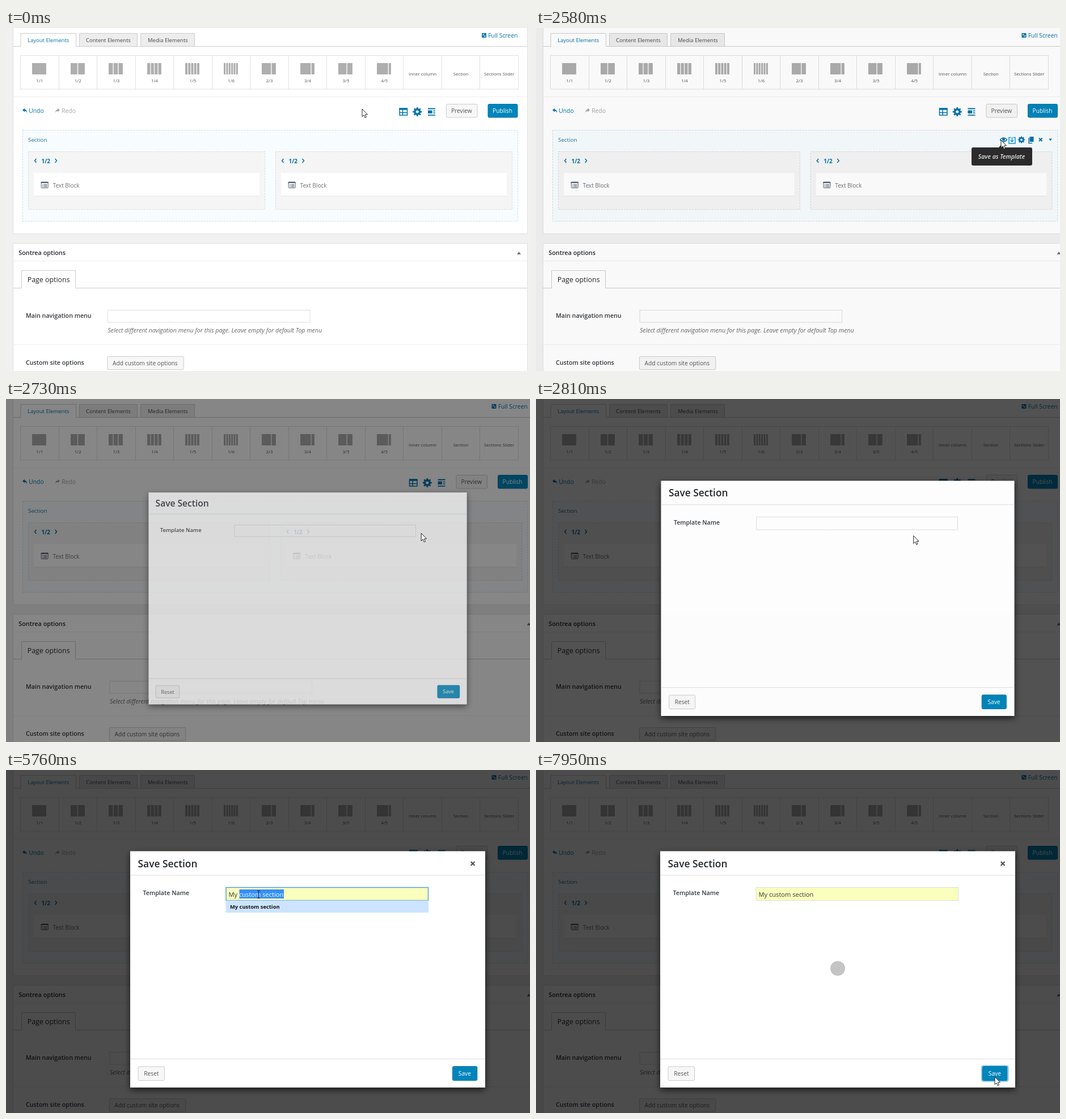
Write an HTML page that moves like this. It is 924x606 px and loops after 8 s.

```html
<!DOCTYPE html>
<html lang="en">
<head>
<meta charset="utf-8">
<title>Save section as template</title>
<style>
  html, body { margin: 0; width: 100%; height: 100%; overflow: hidden; background: #f1f1f1; }
  svg { display: block; width: 924px; height: 606px; font-family: "Open Sans", "Noto Sans", sans-serif; }
  text { white-space: pre; }
</style>
</head>
<body>
<svg id="stage" viewBox="0 0 924 606" xmlns="http://www.w3.org/2000/svg"></svg>
<script>
const LOOP = 8000;
const BLUE = '#0073aa';
const stage = document.getElementById('stage');

// Markup helpers
const text = (x, y, str, size = 10.2, fill = BLUE, extra = '') =>
  `<text x="${x}" y="${y}" font-size="${size}" fill="${fill}" ${extra}>${str}</text>`;
const rect = (x, y, w, h, fill, stroke = 'none', extra = '') =>
  `<rect x="${x}" y="${y}" width="${w}" height="${h}" fill="${fill}" stroke="${stroke}" ${extra}/>`;
const path = (d, fill = 'none', stroke = 'none', width = 1, extra = '') =>
  `<path d="${d}" fill="${fill}" stroke="${stroke}" stroke-width="${width}" ${extra}/>`;
const group = (id, content, extra = '') => `<g id="${id}" ${extra}>${content}</g>`;
const at = (x, y, content) => `<g transform="translate(${x} ${y})">${content}</g>`;
const button = (x, y, w, h, label, tx, primary) =>
  rect(x, y, w, h, primary ? '#0085ba' : '#f7f7f7', primary ? '#0073aa' : '#ccc', 'rx="2"') +
  text(tx, y + h / 2 + 3.8, label, 10.2, primary ? '#fff' : '#555');
const bold = 'font-weight="600"';
const italic = 'font-style="italic"';
const center = 'text-anchor="middle"';

const gear = (x, y, r) => at(x, y,
  `<g fill="none" stroke="${BLUE}"><circle r="${r * .56}" stroke-width="${r * .46}"/>` +
  `<circle r="${r * .85}" stroke-width="${r * .34}" pathLength="16" stroke-dasharray="1 1" stroke-dashoffset=".5"/></g>`);

function layoutElements() {
  const labels = ['1/1', '1/2', '1/3', '1/4', '1/5', '1/6', '2/3', '3/4', '3/5', '4/5',
    'Inner column', 'Section', 'Sections Slider'];
  const cell = 878 / 13;
  return rect(25.5, 48.5, 878, 59.5, '#fff', '#e1e1e1') + labels.map((label, i) => {
    const left = 25.5 + i * cell, cx = left + cell / 2;
    let out = i ? path(`M${Math.floor(left) + .5} 48.5V108`, 'none', '#e1e1e1') : '';
    if (i > 9) return out + text(cx, 83.5, label, 7.9, '#555', center);
    const [a, b] = label.split('/').map(Number);
    const parts = i < 6 ? Array(b).fill(1 / b) : [a / b, 1 - a / b];
    let x = Math.floor(cx - 12.7);
    for (const p of parts) {
      out += rect(x, 62, p * 26.2 - 1.3, 20, '#aeaeae');
      x += p * 26.2;
    }
    return out + text(cx, 96, label, 7.9, '#555', center);
  }).join('');
}

function column(x, w) {
  return at(x, 0,
    rect(0, 218.5, w, 102, '#f5f5f5', '#d9d9d9', 'stroke-dasharray="3 2"') +
    path('M14 231L11 234.5 14 238M47 231L50 234.5 47 238', 'none', BLUE, 1.5) +
    text(23, 238.6, '1/2', 10, BLUE, 'font-weight="700"') +
    rect(9.5, 256, w - 19, 41.5, '#e4e4e4') + rect(9.5, 256, w - 19, 40.5, '#fff') +
    rect(22.7, 272, 12, 10.5, '#fff', '#5d6470', 'rx="1"') +
    path('M22 273H35', 'none', '#5d6470', 2) +
    path('M24.5 276.5H26M24.5 278.5H26M24.5 280.5H26M27 276.5H33M27 278.5H33M27 280.5H33', 'none', '#5d6470') +
    text(43, 281.6, 'Text Block', 10.1, '#6c7075'));
}

function sectionTools(d) {
  return at(d, 0,
    path('M801 197.5Q807 190.5 813 197.5 807 204.5 801 197.5Z', '#fff', BLUE, 1.3) +
    `<circle cx="807" cy="197" r="2.5" fill="${BLUE}"/>` +
    path('M820 193.5H816.5V204H827.5V193.5H824M822 193V200M819.5 198.5L822 201 824.5 198.5', 'none', '#109bd8', 1.5) +
    gear(838.5, 197.5, 6) +
    rect(853, 192, 7, 9, BLUE) + path('M851.5 194V203.5H857.5', 'none', BLUE, 1.4) +
    path('M869.5 194.5L875 200M875 194.5L869.5 200', 'none', BLUE, 1.9) +
    path('M886.8 195.5H892.5L889.6 199.5Z', BLUE));
}

// d: extra width gained once the scrollbar is gone
function page(d) {
  const right = 919 + d, field = d * .2, col = 417 + d / 2;
  const undo = path('M29 145L33 141.8V144Q37 144 36.8 150 35.5 146.6 33 146.6V148.4Z', 'currentColor');
  return rect(12.5, -5, right - 12, 368.5, '#fff', '#e1e1e1') +
    path(`M12 32.5H${right}`, 'none', '#ccc') +
    path('M26 33V9.5H123.5V33', '#fff', '#ccc') +
    path('M129.5 32.5V9.5H231.5V32.5ZM237.5 32.5V9.5H332.5V32.5Z', '#ededed', '#ccc') +
    text(38, 25, 'Layout Elements', 9.5) +
    text(141, 25, 'Content Elements', 9.5, '#444') +
    text(250, 25, 'Media Elements', 9.5, '#444') +
    at(d, 0, rect(839, 9, 8, 8, BLUE, 'none', 'rx="1"') +
      path('M841 11L845 15M841 13.5V11H843.5M845 12.5V15H842.5', 'none', '#fff', .8) +
      text(850.3, 16.8, 'Full Screen', 10.3)) +
    layoutElements() +
    path(`M13 121.5H${right}`, 'none', '#eee') +
    `<g color="${BLUE}">${undo}</g>` + text(40.3, 150, 'Undo', 10.3) +
    `<g color="#a0a5aa" transform="translate(124 0) scale(-1 1)">${undo}</g>` + text(98.2, 150, 'Redo', 10.3, '#a0a5aa') +
    at(d, 0,
      rect(694, 142, 13.5, 12, '#fff', BLUE, 'stroke-width="1.5"') +
      path('M693.5 143.2H708', 'none', BLUE, 3) +
      path('M694 149.5H708M699.5 144V154', 'none', BLUE, 1.5) +
      gear(725.3, 148, 7.8) +
      path('M744 142.5H757M744 153.8H757', 'none', BLUE, 1.8) +
      rect(744, 145.5, 7.5, 5.5, BLUE) + path('M753 146.5H757M753 150H757', 'none', BLUE, 1.5) +
      button(776.5, 134.5, 54.5, 23.5, 'Preview', 785, false) +
      button(850, 134.5, 52, 23.5, 'Publish', 858, true)) +
    rect(29.5, 180.5, 873 + d, 161, '#f7fcfe', '#cfdde2', 'stroke-dasharray="3 2"') +
    text(39, 200.6, 'Section', 9.8, '#1f7099') +
    column(39.5, col) + column(475.5 + d / 2, col) +
    rect(12.5, 380.5, right - 12, 240, '#fff', '#e1e1e1') +
    text(22.3, 400.6, 'Sontrea options', 10.8, '#23282d', bold) +
    at(d, 0, path('M901 400L904.5 395 908 400Z', '#72777c')) +
    path(`M13 411.5H${right}M13 559.5H${right}`, 'none', '#eee') +
    path(`M12 459.5H27.5V428.5H122.5V459.5H${right}`, 'none', '#ccc') +
    text(37.7, 449, 'Page options', 12.4, '#23282d') +
    text(35, 511.8, 'Main navigation menu', 10.7, '#32373c', bold) +
    text(35, 595, 'Custom site options', 10.7, '#32373c', bold) +
    at(field, 0,
      rect(179.5, 498.5, 356.5, 21.5, '#fff', '#ddd') +
      text(179.5, 538.4, 'Select different navigation menu for this page. Leave empty for default Top menu', 10.67, '#666', italic) +
      button(178.8, 580.5, 134.5, 23, 'Add custom site options', 188, false));
}

const modal =
  rect(219, 143.5, 626, 417.5, '#fff', 'none', 'filter="url(#shadow)"') +
  path('M219 186H845M219 510.5H845', 'none', '#ddd') +
  text(232.5, 171.6, 'Save Section', 17.4, '#23282d', bold) +
  group('close', path('M819.7 162L826.5 168.8M826.5 162L819.7 168.8', 'none', '#5c504a', 2.3)) +
  text(241.5, 221, 'Template Name', 10.7, '#32373c', bold) +
  rect(388, 207.5, 356.5, 23, '#fff', '#ddd', 'id="field"') +
  rect(411.5, 211, 78.5, 16, '#3390ff', 'none', 'id="selection"') +
  `<text y="223.5" x="392.5" font-size="11.1" fill="#32373c"><tspan id="typed"></tspan><tspan id="rest"></tspan></text>` +
  rect(0, 211, 1, 16, '#222', 'none', 'id="caret"') +
  group('suggest', rect(388, 231, 356.5, 20.5, '#fff', '#c9d3dc', 'id="option"') +
    text(395, 244.6, 'My custom section', 9.4, '#111', 'font-weight="700"')) +
  button(233, 524, 46.5, 24.5, 'Reset', 243.3, false) +
  rect(786, 522.8, 46.5, 27, 'none', '#7fc4ea', 'id="ring" rx="3" stroke-width="2"') +
  button(787.5, 523.7, 43.3, 24.8, 'Save', 797.8, true) +
  '<circle id="loader" cx="532" cy="350.5" r="13" fill="#c4c4c4"/>';

const cursors =
  group('arrow', path('M0 0V13.7L3.1 10.8 5.2 15.7 7.4 14.7 5.3 9.9H9.5Z', '#fff', '#111', .9)) +
  group('hand', path('M-1.3 1Q0-.8 1.3 1V6.5Q3 5.6 4 7 6 6.4 6.6 7.8 9 7.4 9 9.5V13L7.5 17H-.5L-5.5 10.5Q-5.3 8.2-3 9.3L-1.3 11Z', '#fff', '#111', .9)) +
  group('beam', path('M-2.5-6.5H-.5L0-6 .5-6.5H2.5M0-6V6M-2.5 6.5H-.5L0 6 .5 6.5H2.5', 'none', '#222', 1.1));

stage.innerHTML =
  '<defs><filter id="shadow" x="-10%" y="-10%" width="120%" height="125%">' +
  '<feDropShadow dx="0" dy="4" stdDeviation="6" flood-opacity=".7"/></filter></defs>' +
  rect(0, 0, 924, 606, '#f1f1f1') +
  group('pageNarrow', page(0)) + group('pageWide', page(17.5)) +
  group('toolsNarrow', sectionTools(0)) + group('toolsWide', sectionTools(17.5)) +
  group('tooltip', rect(768, 211, 107, 32, '#2d2d2d', 'none', 'rx="3"') + path('M815 212L821.5 205 828 212Z', '#2d2d2d') +
    text(779.8, 231, 'Save as Template', 10.5, '#eee', `${italic} ${bold}`)) +
  rect(0, 0, 924, 606, '#000', 'none', 'id="overlay"') +
  group('modal', modal) + group('cursor', cursors);

const el = {};
stage.querySelectorAll('[id]').forEach(node => el[node.id] = node);
const fade = (id, value) => el[id].setAttribute('opacity', Number(value));
const put = (id, attrs) => Object.entries(attrs).forEach(([k, v]) => el[id].setAttribute(k, v));

const ramp = (t, a, b) => Math.min(1, Math.max(0, (t - a) / (b - a)));
const smooth = (t, a, b) => { const p = ramp(t, a, b); return p * p * (3 - 2 * p); };
const within = (t, ...spans) => spans.some(([a, b]) => t >= a && t < b);

// Pointer track: time, x, y
const track = [
  [130, 628, 143], [400, 692, 184], [620, 768, 232], [780, 806, 219], [930, 821, 198.5],
  [2500, 820, 198], [2590, 820, 198], [2730, 733, 237], [2890, 600, 246], [3080, 495, 240],
  [3270, 452, 231], [3480, 445.5, 220], [6600, 445.5, 220], [6800, 548, 322], [6980, 715, 468],
  [7160, 862, 546], [7280, 846, 551], [7470, 809, 542]
];
function pointer(t) {
  const i = track.findIndex(k => k[0] > t);
  if (i === 0) return track[0].slice(1);
  if (i < 0) return track[track.length - 1].slice(1);
  const [a, b] = [track[i - 1], track[i]], p = ramp(t, a[0], b[0]);
  return [1, 2].map(n => a[n] + (b[n] - a[n]) * p);
}

function render(t) {
  const wide = t >= 2500;
  fade('pageNarrow', !wide);
  fade('pageWide', wide);
  fade('toolsNarrow', within(t, [390, 2500]));
  fade('toolsWide', within(t, [2500, 2650]));
  fade('tooltip', ramp(t, 960, 1165) * (1 - ramp(t, 2600, 2720)));
  fade('overlay', .7 * smooth(t, 2550, 2842));

  const open = smooth(t, 2585, 2830), scale = .71 + .29 * open;
  put('modal', { opacity: Math.pow(open, .8), transform: `translate(532 352.3) scale(${scale}) translate(-532 -352.3)` });
  fade('close', t >= 2960);

  const focused = within(t, [3430, 7630]), filled = t >= 5760, picking = within(t, [5760, 6060]);
  put('field', {
    fill: filled ? '#faffbd' : '#fff',
    stroke: focused ? '#5b9dd9' : '#ddd',
    'stroke-width': focused ? 1.5 : 1
  });
  const typed = t < 4350 ? '' : t < 4600 ? 'M' : t < 4900 ? 'My' : 'My ';
  el.typed.textContent = typed;
  el.rest.textContent = filled ? 'custom section' : '';
  el.rest.setAttribute('fill', picking ? '#fff' : '#32373c');
  fade('selection', picking);
  fade('suggest', within(t, [4440, 6060]));
  put('option', { fill: picking ? '#cce4ff' : '#fff', stroke: picking ? '#cce4ff' : '#c9d3dc' });
  put('caret', { x: filled ? 490 : [393, 403, 409, 412][typed.length] });
  fade('caret', within(t, [3430, 3970], [4350, 5360], [6060, 6640], [7120, 7630]));

  fade('ring', t >= 7630);
  fade('loader', ramp(t, 7830, 7945));

  const [x, y] = pointer(t);
  const shape = within(t, [860, 2500], [7400, 7670]) ? 'hand' : within(t, [3340, 6640]) ? 'beam' : 'arrow';
  for (const name of ['arrow', 'hand', 'beam']) fade(name, name === shape);
  put('cursor', { transform: `translate(${x} ${y})` });
}

const start = performance.now();
function tick() {
  render((performance.now() - start) % LOOP);
  requestAnimationFrame(tick);
}
tick();
</script>
</body>
</html>
```
